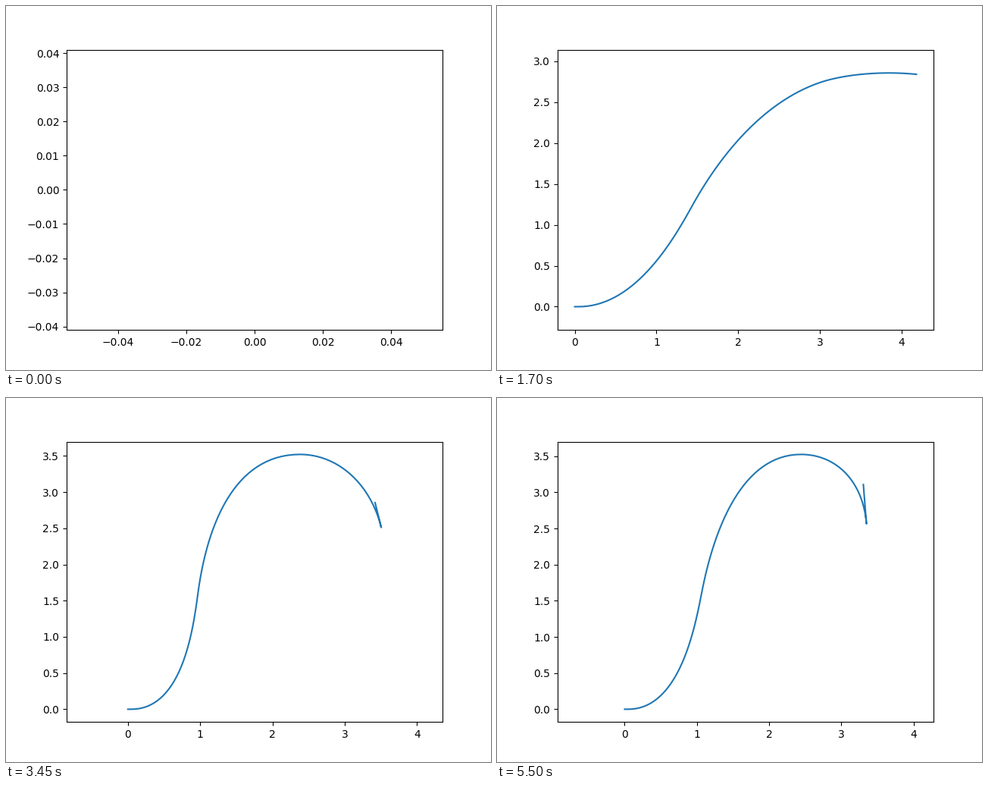
Animation of 640 by 480 pixels, one loop 5.55 s. Source, as a matplotlib script:

```python
import numpy as np
import matplotlib.pyplot as plt
from matplotlib.animation import FuncAnimation

FRAMES = 111
INTERVAL = 50
GROWN = 12      # step at which the path has reached its full length
BACKING = 43    # step at which the path starts to end in reverse

START = np.array([0.05, 0])
PIVOT = np.array([0.75, 0])  # the tangent at the bend always runs through here

# Key points of the path over time: where it changes its turning direction,
# its crown (x, y, heading) and its tip (x, y, heading).
times = np.array([GROWN, 22, 34, 48, 69, 88, 110], float)
bends = [(1.9, 1.15), (1.75, 1.17), (1.43, 1.22), (1.16, 1.45),
         (0.965, 1.57), (1, 1.53), (1.06, 1.58)]
crowns = [(3.1, 2.27, 41), (3.3, 2.52, 28.4), (3, 2.74, 18.8), (2.88, 3.135, 0),
          (2.38, 3.522, 0), (2.4, 3.555, 0), (2.44, 3.525, 0)]
tips = [(3.85, 2.86, 35), (4.18, 2.887, 18), (4.18, 2.84, -6),
        (3.985, 2.7, -38), (3.505, 2.512, -76), (3.4, 2.538, -82.5),
        (3.347, 2.565, -85.5)]


def ease(n, keys):
    """Smooth cubic motion through the keys."""
    p = np.array(keys, float)
    m = np.gradient(p, times, axis=0, edge_order=2)
    i = min(np.searchsorted(times, n, side="right") - 1, len(times) - 2)
    h = times[i + 1] - times[i]
    s = (n - times[i]) / h
    return ((1 + 2 * s) * (1 - s) ** 2 * p[i] + s * (1 - s) ** 2 * h * m[i]
            + s * s * (3 - 2 * s) * p[i + 1] + s * s * (s - 1) * h * m[i + 1])


def heading(deg):
    return np.array([np.cos(np.radians(deg)), np.sin(np.radians(deg))])


def cross(a, b):
    return a[0] * b[1] - a[1] * b[0]


def meet(p, u, q, w):
    """Crossing of the line through p along u and the line through q along w."""
    return p + u * cross(q - p, w) / cross(u, w)


def curve(p, corner, q, a, b):
    """Bezier from p to q with handles reaching a and b of the way to corner."""
    t = np.linspace(0, 1, 40)[:, None]
    c, d = p + a * (corner - p), q + b * (corner - q)
    return ((1 - t) ** 3 * p + 3 * t * (1 - t) ** 2 * c
            + 3 * t * t * (1 - t) * d + t ** 3 * q)


def path_at(n):
    if n == 0:
        return np.zeros((1, 2))
    k = max(n, GROWN)
    bend = ease(k, bends)
    *crown, crown_dir = ease(k, crowns)
    *tip, tip_dir = ease(k, tips)
    crown, tip = np.array(crown), np.array(tip)
    top, out = heading(crown_dir), heading(tip_dir)
    back = 0.61 * (1 - np.exp(-max(n - BACKING, 0) / 30))

    # A handle that reaches the corner leaves no curvature at the bend.
    path = np.vstack([
        (0, 0),
        curve(START, PIVOT, bend, 1, 0.3),
        curve(bend, meet(bend, bend - PIVOT, crown, top), crown, 0.2, 1),
        curve(crown, meet(crown, top, tip, out), tip, 0.6, 0.6),
        tip - back * out,
    ])
    if n < GROWN:
        path = path * ((1 - np.exp(-n / 4.93)) / (1 - np.exp(-GROWN / 4.93)),
                       1 - np.exp(-(n / 5) ** 2))
    return path


fig, ax = plt.subplots(figsize=(6.4, 4.8), dpi=100)
ax.set_aspect("equal", adjustable="datalim")
line, = ax.plot([0], [0])


def update(n):
    line.set_data(*path_at(n).T)
    ax.relim()
    ax.autoscale_view()
    return line,


anim = FuncAnimation(fig, update, frames=FRAMES, interval=INTERVAL,
                     repeat=True, repeat_delay=0, blit=False)
plt.show()
```
